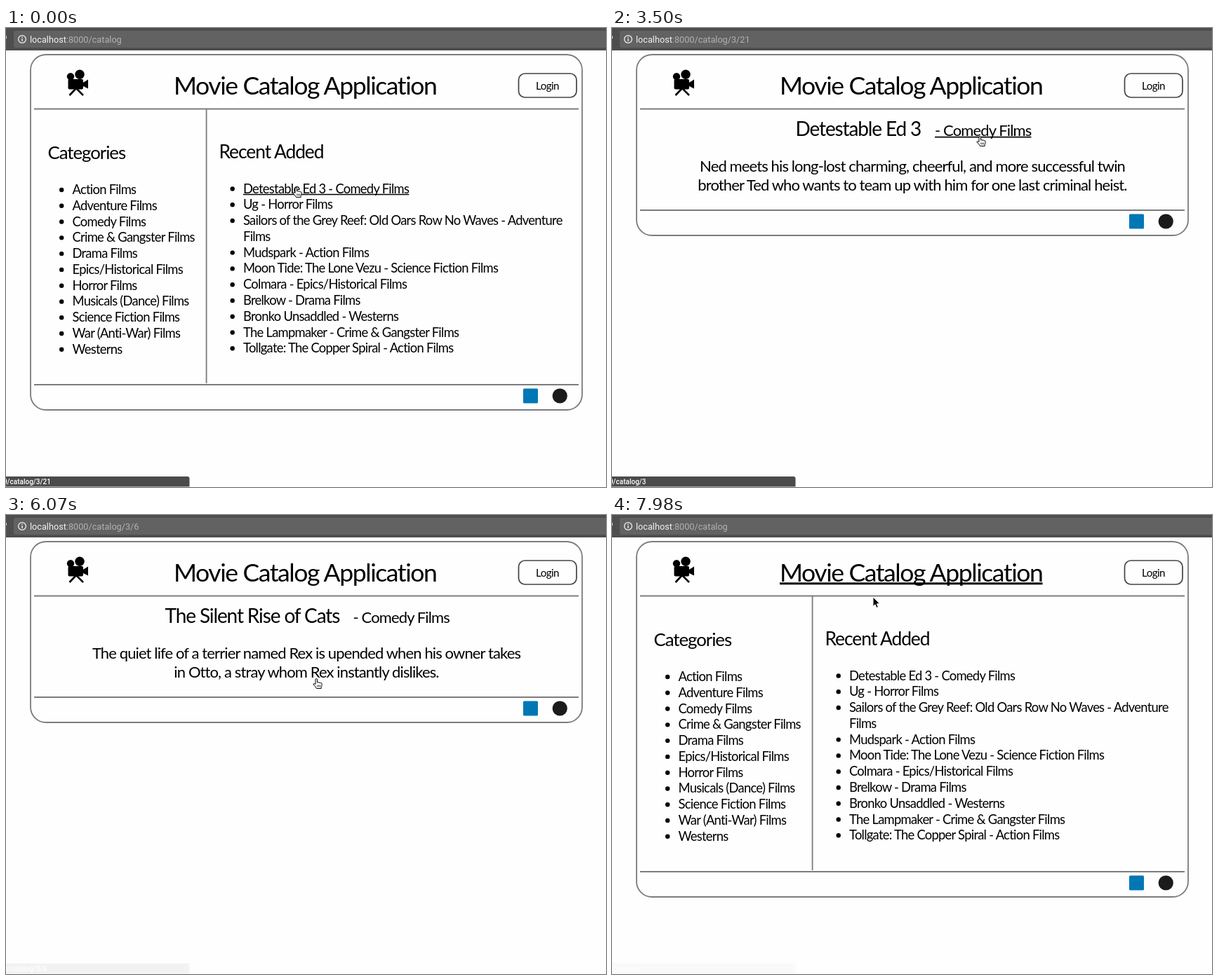
Recreate the animation shown at these times as an HTML page. Size 855 by 655 pixels, loop 8 s.

```html
<!DOCTYPE html>
<html lang="en">
<head>
<meta charset="utf-8">
<title>Movie Catalog Application</title>
<style>
  html, body { margin: 0; width: 100%; height: 100%; overflow: hidden; background: #fefefe; }
  svg { display: block; }
  text { font-family: Lato, "Open Sans", sans-serif; letter-spacing: -.04em; white-space: pre; }
  .ui { font-family: Roboto, Inter, sans-serif; letter-spacing: 0; }
  .rule { fill: none; stroke: #7c7c7c; stroke-width: 1.8; }
  .mid { text-anchor: middle; }
</style>
</head>
<body>
<svg id="stage" width="855" height="655" viewBox="0 0 855 655"></svg>
<script>
const stage = document.getElementById('stage');
const $ = id => document.getElementById(id);

const text = (x, y, size, str, attrs = '') =>
  `<text x="${x}" y="${y}" font-size="${size}" ${attrs}>${str.replace('&', '&amp;')}</text>`;
const link = (id, thick) => `data-link="${id}" data-thick="${thick}"`;
const rule = d => `<path class="rule" d="${d}"/>`;

const list = (x, y, lines, firstLink) => lines.map((line, i) => {
  const base = y + i * 22.78;
  const bullet = line[0] === ' ' ? '' : `<circle cx="${x - 15.3}" cy="${base - 6}" r="3.2"/>`;
  return bullet + text(x, base, 18.4, line.trim(), i === 0 && firstLink ? link(firstLink, 1.5) : '');
}).join('');

// Card outline, footer rule and the two footer badges
const frame = (bottom, badgeX) => `
  <rect class="rule" x="35" y="38" width="786" height="${bottom - 38}" rx="22"/>
  ${rule(`M40 ${bottom - 36}H816`)}
  <rect x="${badgeX}" y="${bottom - 30.5}" width="21" height="21" rx="1.5" fill="#0077b5"/>
  <circle cx="${badgeX + (badgeX > 750 ? 42 : 52.3)}" cy="${bottom - 20}" r="10.6" fill="#1b1b1b"/>`;

const categories = ['Action Films', 'Adventure Films', 'Comedy Films', 'Crime & Gangster Films',
  'Drama Films', 'Epics/Historical Films', 'Horror Films', 'Musicals (Dance) Films',
  'Science Fiction Films', 'War (Anti-War) Films', 'Westerns'];

const recent = ['Detestable Ed 3 - Comedy Films', 'Ug - Horror Films',
  'Sailors of the Grey Reef: Old Oars Row No Waves - Adventure', ' Films',
  'Mudspark - Action Films', 'Moon Tide: The Lone Vezu - Science Fiction Films',
  'Colmara - Epics/Historical Films', 'Brelkow - Drama Films', 'Bronko Unsaddled - Westerns',
  'The Lampmaker - Crime & Gangster Films', 'Tollgate: The Copper Spiral - Action Films'];

const listPage = (id, heading, items, badgeX) => `<g id="${id}" class="page">
  ${frame(545, badgeX)}${rule('M285.6 116V507')}
  ${text(59.5, 187, 25.8, 'Categories')}${list(94.5, 237, categories)}
  ${text(303.5, 186, 26.4, heading)}${list(338, 235.5, items, id + 'Link')}</g>`;

const filmPage = (id, titleX, title, genreX, lines) => `<g id="${id}" class="page">
  ${frame(296, 737)}
  ${text(titleX, 153.5, 28, title)}${text(genreX, 153.5, 22, '- Comedy Films', link(id + 'Link', 1.7))}
  ${lines.map((line, i) => text(428, 205 + 27 * i, 22, line, 'class="mid"')).join('')}</g>`;

stage.innerHTML = `
  <rect width="855" height="32" fill="#4e4e4e"/>
  <path d="M855 4H14q-3 0-3 3V25q0 3 3 3H855Z" fill="#626262"/>
  <path d="M0 11.5V15" stroke="#ddd" stroke-width="2"/>
  <circle cx="23" cy="16" r="5.4" fill="none" stroke="#eee" stroke-width="1.3"/>
  <path d="M23 15V19M23 12.6V14" stroke="#eee" stroke-width="1.4"/>
  <text class="ui" x="34" y="20.5" font-size="12.7" fill="#f2f2f2">localhost<tspan id="url" fill="#b2b2b2"></tspan></text>

  <circle cx="92" cy="69.3" r="5.2"/><circle cx="105" cy="66.2" r="6.7"/>
  <rect x="88.5" y="73" width="21.5" height="14.5" rx="2"/>
  <path d="M109 78.5L117 73.5V86.5L109 82.5Z"/>
  <path d="M100 86L90.5 96M100 86L110 96" stroke="#000" stroke-width="2.6"/>
  ${text(239, 95, 35.6, 'Movie Catalog Application', link('title', 3))}
  <rect x="730.5" y="65" width="82.5" height="34" rx="9" fill="none" stroke="#444" stroke-width="1.7"/>
  ${text(771.5, 88, 15.2, 'Login', 'class="mid"')}
  ${rule('M40 115.5H816')}

  ${listPage('home', 'Recent Added', recent, 737)}
  ${filmPage('film1', 261.5, 'Detestable Ed 3', 460, [
    'Ned meets his long-lost charming, cheerful, and more successful twin',
    'brother Ted who wants to team up with him for one last criminal heist.'])}
  ${listPage('comedy', 'Comedy Films', ['The Silent Rise of Cats', 'Detestable Ed 3'], 763)}
  ${filmPage('film2', 226.5, 'The Silent Rise of Cats', 494.5, [
    'The quiet life of a terrier named Rex is upended when his owner takes',
    'in Otto, a stray whom Rex instantly dislikes.'])}

  <g id="status">
    <path d="M0 640H258.5q3 0 3 3V654.5H0Z" fill="#4b4b4b"/>
    <text id="statusText" class="ui" x="-65" y="650.6" font-size="10" font-weight="500" fill="#fff"></text>
  </g>
  <g id="cursor">
    <g id="hand" transform="translate(-5 0)" fill="#fff" stroke="#000" stroke-linejoin="round">
      <path d="M4 8.5V1.9a1.3 1.3 0 0 1 2.6 0V6q1.3-1 2.4.3 1.3-.7 2.2.4 2-.3 2 1.6 0 2.7-1 4.2V14.5H5.5Q4.5 12 1.2 9.2 .6 7.6 2.2 7.7Z"/>
      <path d="M6.8 9.6V12.4M8.7 9.6V12.4M10.6 9.6V12.4" stroke-width=".8"/>
    </g>
    <path id="arrow" d="M0 0V13.5L3 10.8 5 15.4 7.4 14.4 5.4 9.8H9.6Z" stroke="#fff"/>
    <path id="beam" d="M-3-7Q0-7 0-5V5Q0 7-3 7M3-7Q0-7 0-5V5Q0 7 3 7M-1.8 2H1.8" fill="none" stroke="#222" stroke-width="1.1"/>
  </g>`;

// Give every link its underline
for (const el of stage.querySelectorAll('[data-link]')) {
  const thick = +el.dataset.thick, x = +el.getAttribute('x'), y = +el.getAttribute('y');
  el.insertAdjacentHTML('afterend', `<rect id="${el.dataset.link}" class="underline" x="${x}"
    y="${y + 1.3}" width="${el.getComputedTextLength()}" height="${thick}"/>`);
}

// Timelines: [ms, value], each value holds until the next
const pages = [[0, 'home'], [810, 'film1'], [3560, 'comedy'], [5780, 'film2'], [7680, 'home']];
const urls = [[0, ''], [750, '/3/21'], [3560, '/3'], [5720, '/3/6'], [7620, '']];
const hovers = [[0, 'homeLink'], [810, ''], [2700, 'film1Link'], [3560, ''], [4640, 'comedyLink'],
  [5780, ''], [7200, 'title'], [7680, ''], [7860, 'title']];
const targets = [[0, '/3/21'], [2700, '/3'], [4640, '/3/6'], [7200, '']];
const fades = [[0, 1], [1050, .5], [1170, 0], [2700, 1], [3830, .5], [3950, 0], [4640, 1],
  [6010, .5], [6070, .06], [7200, 1], [7860, .5], [7980, .02]];
const shapes = [[0, 'hand'], [1350, 'beam'], [2700, 'hand'], [4250, 'arrow'], [4640, 'hand'],
  [6750, 'beam'], [6930, 'arrow']];

// Pointer path: [ms, x, y]
const path = [[0, 413, 227], [60, 413, 228], [210, 414, 228], [1290, 414, 228], [1350, 405, 225],
  [1700, 298, 200], [2000, 398, 215], [2120, 465, 185], [2170, 468, 183], [2700, 508, 162],
  [2940, 524, 155], [3180, 524, 154], [4190, 524, 154], [4250, 516, 162], [4820, 443, 234],
  [5330, 443, 234], [5390, 442, 233], [6690, 442, 233], [6750, 441, 222], [7450, 430, 84],
  [7800, 430, 84], [7860, 410, 98], [7980, 372, 117], [8000, 372, 117]];

const at = (track, t) => track.findLast(k => k[0] <= t)[1];

function pointer(t) {
  const i = path.findLastIndex(k => k[0] <= t), a = path[i], b = path[i + 1];
  const held = Math.floor((t - a[0]) / 60) * 60;
  const p = held / (b[0] - a[0]);
  return [1, 2].map(n => Math.round(a[n] + (b[n] - a[n]) * p));
}

function showOnly(selector, id) {
  for (const el of stage.querySelectorAll(selector)) el.style.display = el.id === id ? '' : 'none';
}

function draw(now) {
  const t = now % 8000;
  showOnly('.page', at(pages, t));
  showOnly('.underline', at(hovers, t));
  showOnly('#cursor > *', at(shapes, t));
  $('url').textContent = ':8000/catalog' + at(urls, t);
  $('statusText').textContent = 'localhost:8000/catalog' + at(targets, t);
  $('status').setAttribute('opacity', at(fades, t));
  $('cursor').setAttribute('transform', `translate(${pointer(t)})`);
}

const start = performance.now();
function tick() {
  draw(performance.now() - start);
  requestAnimationFrame(tick);
}
tick();
</script>
</body>
</html>
```
